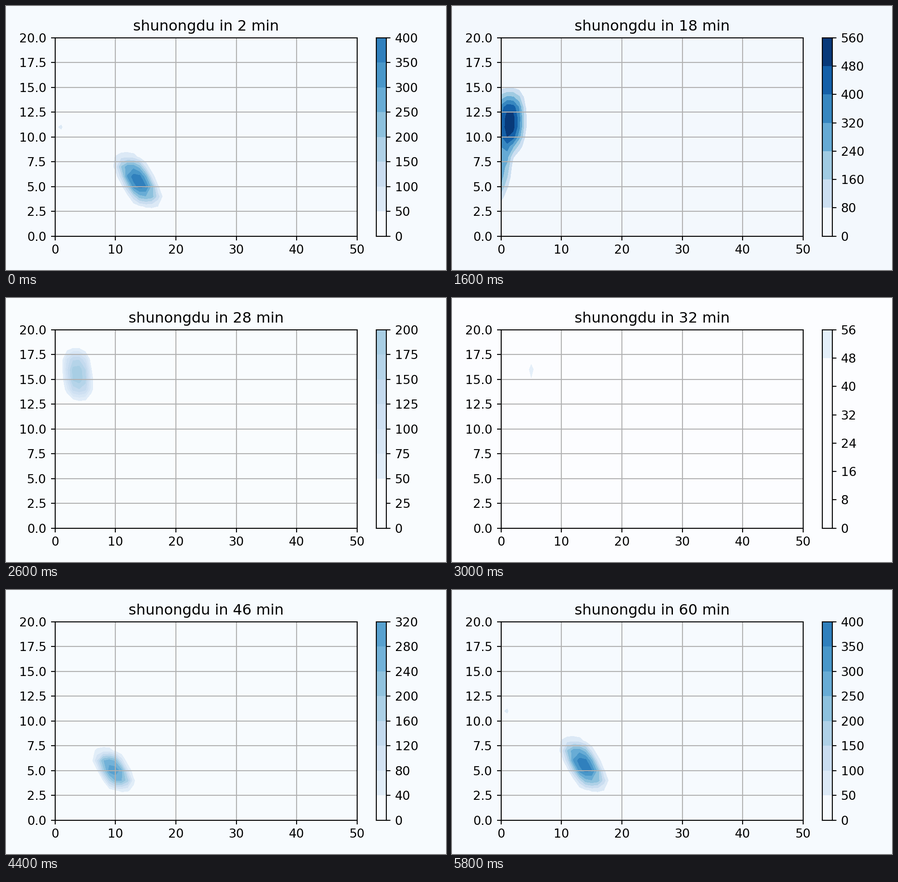
Recreate the animation shown at these times as a matplotlib script. Size 966x580 px, loop 6000 ms.

```python
import numpy as np
import matplotlib.pyplot as plt
from matplotlib.animation import FuncAnimation
from matplotlib.colors import ListedColormap, Normalize

W, H, DPI = 966, 580, 193.2
FRAMES, STEP_MS = 30, 200
PERIOD = 58  # minutes after which the plumes repeat

# Each plume is one soft lobe gliding between a few poses:
# (minute, peak, x, y, half width, half height, tilt)
DRIFT = [
    (2, 380, 13.7, 5.6, 2.3, 2.1, -.8),
    (6, 18, 14.3, 5.6, 2.3, 2.1, -.8),
    (8, 0, 9.7, 5, 2.1, 1.65, -.8),
    (32, 0, 9.7, 5, 2.1, 1.65, -.8),
    (46, 315, 9.7, 5.05, 2.1, 1.65, -.8),
]
HEAD = [
    (2, 56, .8, 11, 1.25, 1.1, 0),
    (6, 0, .2, 4.9, 1, 1.6, .15),
    (8, 440, .2, 4.9, 1, 1.6, .15),
    (18, 515, 1.4, 11.7, 2.2, 2.6, 0),
    (24, 330, 2.5, 15.1, 3, 3.1, -.3),
    (32, 55.5, 5, 15.9, 1.25, 1.6, 0),
    (36, 0, 5, 16, 1.25, 1.6, 0),
]
STEM = [
    (8, 0, 0, 5, 1, 1.6, .2),
    (18, 280, 0, 6.8, 1.5, 3.1, .25),
    (24, 80, 0, 8, .95, 5, .06),
    (32, 0, 0, 8, .95, 5, .06),
]

X, Y = np.meshgrid(np.arange(51.0), np.arange(21.0))


def lobe(poses, minute):
    times, *tracks = zip(*poses)
    peak, cx, cy, w, h, tilt = (
        np.interp(minute, times, track, period=PERIOD) for track in tracks)
    dx = (X - cx - tilt * (Y - cy)) / w
    dy = (Y - cy) / h
    return peak * np.exp(-np.abs(dx) ** 3 - np.abs(dy) ** 3)


def density(minute):
    return sum(lobe(poses, minute) for poses in (DRIFT, HEAD, STEM))


# Low counts stay clear
shades = plt.get_cmap("Blues")(np.arange(256))
shades[:24, 3] = 0
cmap = ListedColormap(shades)
norm = Normalize(0, 540)

plt.rcParams.update({"font.family": "DejaVu Sans", "font.size": 10})
# The small margin keeps the pixel size from rounding down
fig = plt.figure(figsize=((W + .01) / DPI, (H + .01) / DPI), dpi=DPI)


def add_axes(left, right, top=69.8, bottom=505.7):
    return fig.add_axes([left / W, 1 - bottom / H, (right - left) / W, (bottom - top) / H])


ax = add_axes(107.7, 770.8)
cax = add_axes(812.8, 834.8)
ax.set(xlim=(0, 50), ylim=(0, 20), yticks=np.arange(0, 20.1, 2.5))
ax.grid(True)
title = ax.set_title("", fontsize=12)

PALE, TINT = np.array([253, 254, 255]) / 255, np.array([243, 248, 253]) / 255


def draw_bar(levels):
    cax.clear()
    mids = (levels[1:] + levels[:-1]) / 2
    cax.pcolormesh([0, 1], levels, mids[:, None], cmap=cmap, norm=norm)
    cax.set(xlim=(0, 1), ylim=(levels[0], levels[-1]), xticks=[])
    cax.yaxis.tick_right()
    cax.set_yticks(levels)


def update(n):
    minute = 2 * (n + 1)
    for old in list(ax.collections):
        old.remove()
    filled = ax.contourf(X, Y, density(minute), cmap=cmap, norm=norm)
    levels = np.asarray(filled.levels)
    draw_bar(levels)
    back = PALE + (TINT - PALE) * min(levels[-1] / 560, 1)
    fig.set_facecolor(back)
    for area in (ax, cax):
        area.set_facecolor(back)
    title.set_text(f"shunongdu in {minute} min")
    return []


anim = FuncAnimation(fig, update, frames=FRAMES, interval=STEP_MS,
                     init_func=lambda: [], repeat=True, repeat_delay=0, blit=False)
plt.show()
```
